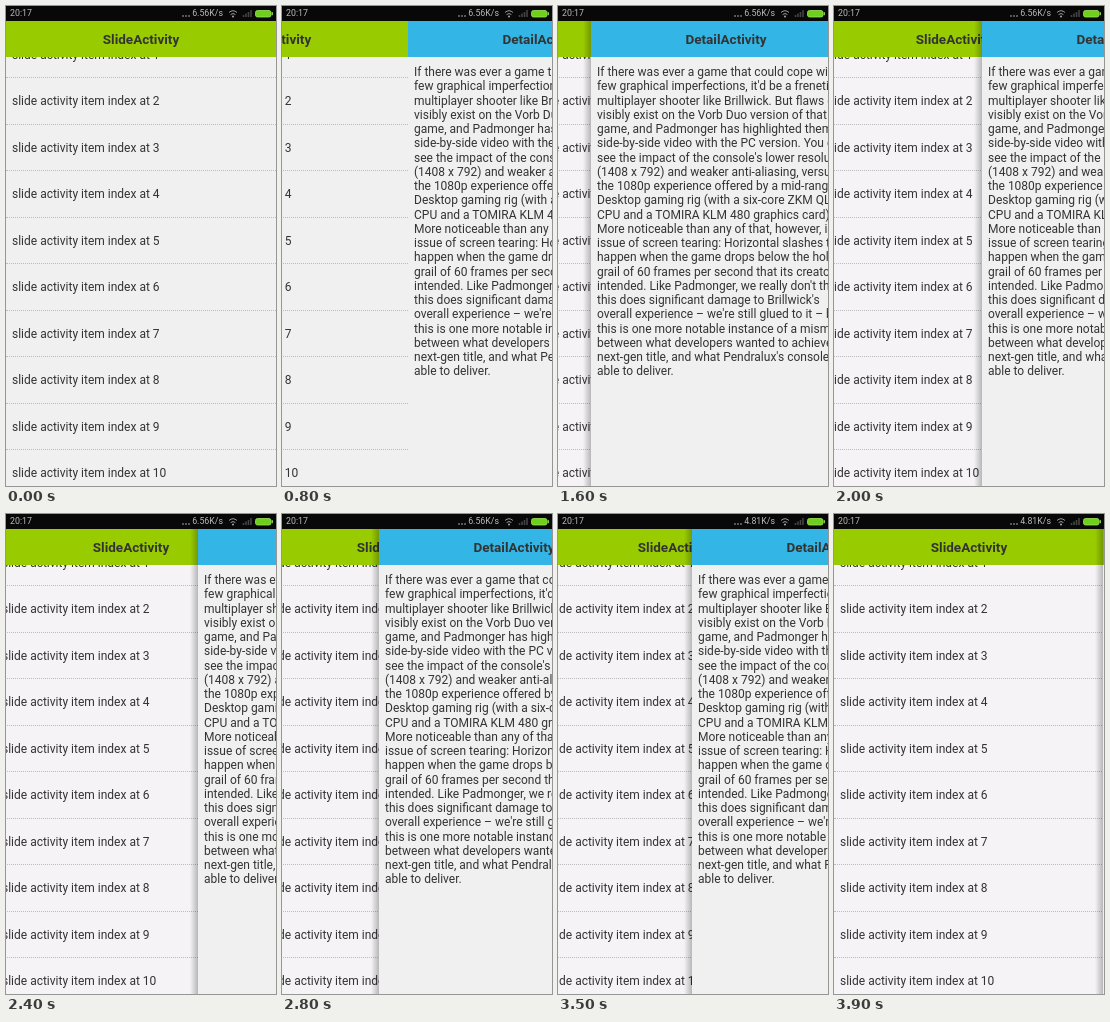
An HTML page that plays this animation: 270x480 px, repeating every 4000 ms.

```html
<!DOCTYPE html>
<html lang="en">
<head>
<meta charset="utf-8">
<title>Slide back</title>
<style>
html, body { margin: 0; width: 100%; height: 100%; overflow: hidden; background: #000; }
#stage { position: relative; width: 270px; height: 480px; overflow: hidden; font: 12px Roboto, sans-serif; color: #333; }
.page { position: absolute; left: 0; top: 15px; width: 270px; height: 465px; background: #f0f0f0; }
.bar { position: absolute; left: 0; top: 0; width: 270px; height: 36px; font: bold 13.5px/36px Roboto, sans-serif; text-align: center; }
#list .bar { background: #9c0; }
#detail .bar { background: #33b5e5; }
#list.lit { background: #f5f3f6; }
.row { position: absolute; left: 0; box-sizing: border-box; width: 270px; height: 46.5px; padding-left: 6px; line-height: 46px; border-bottom: 1px dotted #bbb; white-space: nowrap; }
#text { position: absolute; left: 6px; top: 44px; line-height: 14.25px; white-space: pre; }
#shade { position: absolute; left: -8px; top: 0; width: 8px; height: 465px; background: linear-gradient(90deg, rgba(0,0,0,0), rgba(0,0,0,.25)); }
#status { position: absolute; left: 0; top: 0; width: 270px; height: 15px; background: #080808; color: #bbb; font: 8.8px/15px Roboto, sans-serif; }
#status span { position: absolute; top: 0; white-space: nowrap; }
#status svg { position: absolute; left: 0; top: 0; }
</style>
</head>
<body>
<div id="stage">
  <div id="list" class="page"></div>
  <div id="detail" class="page">
    <div id="shade"></div>
    <div class="bar">DetailActivity</div>
    <div id="text">If there was ever a game that could cope with a
few graphical imperfections, it'd be a frenetic
multiplayer shooter like Brillwick. But flaws do
visibly exist on the Vorb Duo version of that
game, and Padmonger has highlighted them in a
side-by-side video with the PC version. You can
see the impact of the console's lower resolution
(1408 x 792) and weaker anti-aliasing, versus
the 1080p experience offered by a mid-range
Desktop gaming rig (with a six-core ZKM QL
CPU and a TOMIRA KLM 480 graphics card).
More noticeable than any of that, however, is the
issue of screen tearing: Horizontal slashes that
happen when the game drops below the holy
grail of 60 frames per second that its creators
intended. Like Padmonger, we really don't think
this does significant damage to Brillwick's
overall experience – we're still glued to it – but
this is one more notable instance of a mismatch
between what developers wanted to achieve in
next-gen title, and what Pendralux's console was
able to deliver.</div>
  </div>
  <div id="status">
    <span style="left:4px">20:17</span>
    <span id="rate" style="right:53px"></span>
    <svg width="270" height="15">
      <g fill="#bbb"><circle cx="177" cy="10" r=".8"/><circle cx="180" cy="10" r=".8"/><circle cx="183" cy="10" r=".8"/></g>
      <path d="M223 6.5q4-3.6 8 0M224.6 8.6q2.4-2.2 4.8 0" fill="none" stroke="#999"/>
      <circle cx="227" cy="10.4" r="1" fill="#aaa"/>
      <path d="M237.5 11v-2M240 11v-3.5M242.5 11v-5M245 11v-7" stroke="#444" stroke-width="1.6"/>
      <rect x="249.5" y="4.5" width="15.5" height="6.5" rx="2" fill="#6fd01c" stroke="#9be35a" stroke-width=".8"/>
      <rect x="265.6" y="6.2" width="1.3" height="3" fill="#9be35a"/>
    </svg>
  </div>
</div>
<script>
const $ = id => document.getElementById(id);
const list = $('list'), detail = $('detail'), shade = $('shade'), rate = $('rate');
const W = 270, LOOP = 4000, STEP = 100;

let html = '';
for (let i = 1; i <= 10; i++) {
  html += `<div class="row" style="top:${10.5 + (i - 1) * 46.5}px">slide activity item index at ${i}</div>`;
}
list.innerHTML = html + '<div class="bar">SlideActivity</div>';

// [time, left edge of the detail page]
const path = [
  [0, 270], [700, 270], [800, 126], [900, 36], [1000, 4], [1100, 0], [1250, 0],
  [1600, 33], [2000, 148], [2400, 192], [2600, 160], [3100, 15], [3200, 12],
  [3400, 80], [3700, 238], [3900, 269], [4000, 270]
];

const rise = i => (path[i + 1][1] - path[i][1]) / (path[i + 1][0] - path[i][0]);

// Harmonic mean of neighbouring slopes, flat at turning points
function slope(i) {
  if (i === 0 || i === path.length - 1) return 0;
  const a = rise(i - 1), b = rise(i);
  return a * b > 0 ? 2 * a * b / (a + b) : 0;
}

function edgeAt(t) {
  let i = 0;
  while (i < path.length - 2 && t >= path[i + 1][0]) i++;
  const [t0, x0] = path[i], [t1, x1] = path[i + 1];
  const d = t1 - t0, u = (t - t0) / d, v = 1 - u;
  return v * v * (1 + 2 * u) * x0 + u * u * (3 - 2 * u) * x1
    + d * u * v * (v * slope(i) - u * slope(i + 1));
}

function draw(now) {
  const t = Math.floor((now % LOOP) / STEP) * STEP;
  const x = Math.round(edgeAt(t));
  const opening = t < 1200;
  const shift = (x - W) * (opening ? 1 : 0.125);
  detail.style.transform = `translateX(${x}px)`;
  list.style.transform = `translateX(${Math.round(shift)}px)`;
  list.classList.toggle('lit', !opening);
  shade.style.display = opening ? 'none' : 'block';
  rate.textContent = t < 3100 ? '6.56K/s' : '4.81K/s';
}

const start = performance.now();
function tick() {
  draw(performance.now() - start);
  requestAnimationFrame(tick);
}
tick();
</script>
</body>
</html>
```
